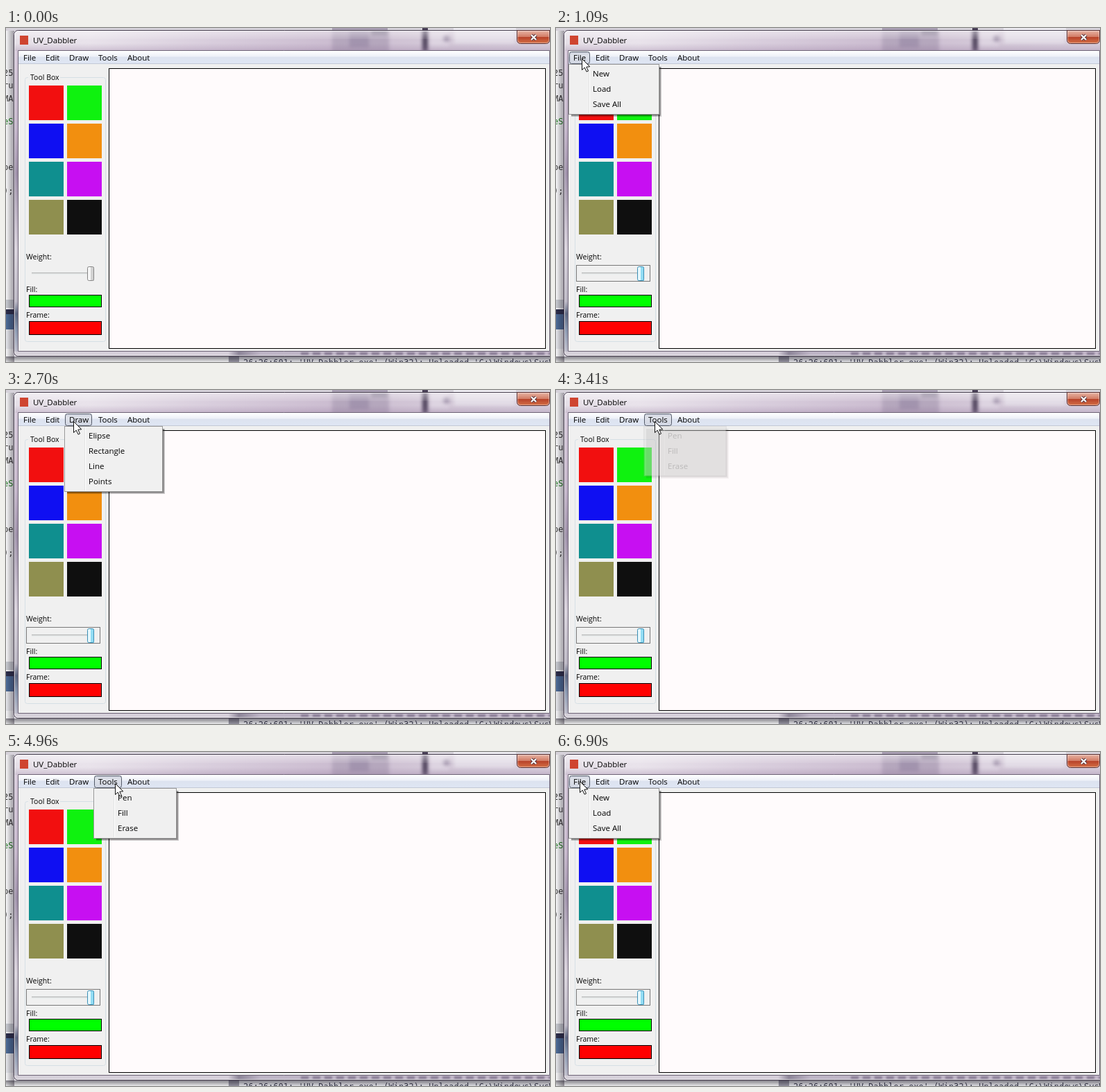
These frames come from a looping animation (784x482 px, 8 s). An HTML page with a canvas:

```html
<!DOCTYPE html>
<html lang="en">
<head>
<meta charset="utf-8">
<title>Paint window</title>
<style>
html, body { margin: 0; width: 100%; height: 100%; overflow: hidden; }
canvas { display: block; width: 784px; height: 482px; }
</style>
</head>
<body>
<canvas id="stage" width="784" height="482"></canvas>
<script>
const W = 784, H = 482, LOOP = 8000;
const UI = '11.5px "Open Sans", sans-serif';
const LABEL = '10.5px "Open Sans", sans-serif';
const CODE = '12px "DejaVu Sans Mono", monospace';

const MENUS = {
  File:  { x: 19,  w: 30, popup: 131, items: ['New', 'Load', 'Save All'] },
  Edit:  { x: 51,  w: 32, popup: 119, items: ['Undo', 'Redo', 'Clear'] },
  Draw:  { x: 85,  w: 39, popup: 142, items: ['Elipse', 'Rectangle', 'Line', 'Points'] },
  Tools: { x: 127, w: 40, popup: 120, items: ['Pen', 'Fill', 'Erase'] },
  About: { x: 169, w: 45, popup: 123, items: ['About'] }
};

// Moment at which each menu title is pressed
const OPENED = [[920, 'File'], [1770, 'Edit'], [2470, 'Draw'], [3320, 'Tools'], [3640, 'About'],
  [4510, 'Tools'], [5520, 'Draw'], [6360, 'Edit'], [6600, 'File']];

// Pointer moves: start time, number of steps, end point
const STEP = 80, SHOWN = 210, START = [562, 419];
const MOVES = [[210, 8, 37, 44], [1700, 2, 53, 43], [2470, 3, 97, 45], [3080, 10, 187, 44],
  [3960, 1, 183, 43], [4120, 2, 172, 43], [4430, 4, 158, 45], [4960, 1, 157, 45],
  [5110, 1, 155, 45], [5360, 5, 104, 44], [6200, 8, 34, 42]];

const stage = document.getElementById('stage').getContext('2d');
const layer = document.createElement('canvas');
layer.width = W;
layer.height = H;
let g = layer.getContext('2d');

function box(x, y, w, h, fill) {
  g.fillStyle = fill;
  g.fillRect(x, y, w, h);
}

function outline(x, y, w, h, color, radius = 0) {
  g.strokeStyle = color;
  g.lineWidth = 1;
  g.beginPath();
  g.roundRect(x + .5, y + .5, w - 1, h - 1, radius);
  g.stroke();
}

function text(s, x, y, font = UI, color = '#000') {
  g.font = font;
  g.fillStyle = color;
  g.fillText(s, x, y);
}

function ramp(x0, y0, x1, y1, ...stops) {
  const r = g.createLinearGradient(x0, y0, x1, y1);
  stops.forEach(([at, color]) => r.addColorStop(at, color));
  return r;
}

function blurred(px, draw) {
  g.save();
  g.filter = `blur(${px}px)`;
  draw();
  g.restore();
}

function backdrop() {
  box(0, 0, W, H, '#f7f7f9');
  box(0, 392, 12, 12, '#c9ccd2');
  box(0, 406, 12, 7, '#2d2f4c');
  box(0, 413, 12, 22, '#4d6c98');
  box(0, 435, 12, 28, '#e6e7ec');
  const lines = [['25', 69], ['ru', 87], ['MA', 106], ['eS', 139, '#1b7a1b'], ['pe', 205], [');', 239]];
  lines.forEach(([s, y, color = '#333']) => text(s, -4, y, CODE, color));

  box(320, 466, 464, 16, '#e9e9ef');
  box(321, 474, 15, 8, '#9a98a6');
  text("26:26:601: 'UV_Dabbler.exe' (Win32): Unloaded 'C:\\Windows\\SysWOW64", 342, 487, CODE, '#3c3c50');

  box(0, 0, 12, H, ramp(0, 0, 12, 0, [0, 'rgba(0,0,0,0)'], [1, 'rgba(30,20,40,.42)']));
  box(0, 474, W, 8, ramp(0, 474, 0, 482, [0, 'rgba(20,15,30,.5)'], [1, 'rgba(0,0,0,.06)']));
  box(0, 0, W, 4, '#d6d2da');
  box(470, 0, 80, 4, '#a89eb2');
  box(600, 0, 8, 4, '#4a4157');
  box(645, 0, 90, 4, '#eceaf0');
}

function glass() {
  g.save();
  g.beginPath();
  g.roundRect(11, 3, W, 471, 6);
  g.clip();
  box(11, 3, W, 471, '#c9bccf');
  box(11, 4, W, 29, ramp(11, 0, W, 0, [0, '#e6e0e8'], [.14, '#e9e3eb'], [.36, '#d9cedd'],
    [.6, '#cbbcd0'], [.82, '#d5cad9'], [1, '#d8cfdd']));
  blurred(2.5, () => {
    box(470, 0, 82, 36, '#b5a7bd');
    box(495, 2, 28, 26, '#a294ae');
    box(526, 0, 24, 10, '#83778f');
    box(600, 0, 8, 34, '#51455e');
    box(612, 4, 26, 24, '#ddd4e1');
    box(646, 2, 88, 20, '#e3dde7');
    g.fillStyle = '#a99cb2';
    g.beginPath();
    g.arc(635, 15, 5, 0, 7);
    g.fill();
  });
  box(11, 4, W, 12, ramp(0, 4, 0, 16, [0, 'rgba(255,255,255,.45)'], [1, 'rgba(255,255,255,.08)']));
  box(11, 22, W, 11, ramp(0, 22, 0, 33, [0, 'rgba(140,110,150,0)'], [1, 'rgba(140,110,150,.28)']));

  // Left and bottom edges
  box(11, 33, 7, 441, ramp(0, 33, 0, 474, [0, '#d7cadb'], [.25, '#c3b4c9'], [.4, '#9d8fa8'],
    [.65, '#d8d2dc'], [.82, '#b9b5c2'], [.86, '#5d6781'], [.91, '#8594ad'], [1, '#c9c4cf']));
  box(11, 467, W, 7, ramp(11, 0, W, 0, [0, '#d5d0d9'], [.4, '#d6cfda'], [.42, '#8d8598'],
    [.46, '#beb5c6'], [1, '#c3b7c9']));
  blurred(1.2, () => {
    for (let x = 425; x < W; x += 17) box(x, 468, 11, 4, '#8a7d95');
  });
  g.restore();
  outline(11, 3, W, 471, '#463d4e', 6);
  outline(12, 4, W, 469, 'rgba(255,255,255,.65)', 5);
}

function closeButton() {
  g.fillStyle = ramp(0, 4, 0, 23, [0, '#e8b4a4'], [.45, '#d27c66'], [.5, '#b8432a'], [1, '#d8754a']);
  g.beginPath();
  g.roundRect(737, 4, 46, 18, [0, 0, 4, 4]);
  g.fill();
  outline(736, 3, 48, 20, '#5a2c2c', [0, 0, 5, 5]);
  outline(737, 4, 46, 18, 'rgba(255,255,255,.4)', [0, 0, 4, 4]);
  for (const [color, width] of [['#57333a', 4.4], ['#fff', 2.3]]) {
    g.strokeStyle = color;
    g.lineWidth = width;
    g.beginPath();
    g.moveTo(757, 10);
    g.lineTo(764, 17);
    g.moveTo(764, 10);
    g.lineTo(757, 17);
    g.stroke();
  }
}

function client() {
  outline(17, 32, 767, 435, '#6d6376');
  box(18, 33, 765, 433, '#f0f0f0');
  box(18, 33, 765, 19, ramp(0, 33, 0, 52, [0, '#ffffff'], [.4, '#eef1f8'], [.5, '#dde3f0'], [1, '#dfe6f4']));
  box(18, 51, 765, 1, '#c3c9d6');
  box(148, 58, 630, 405, '#000');
  box(149, 59, 628, 403, '#fffbfc');

  outline(27, 71, 117, 382, '#d5dfe5', 3);
  box(32, 69, 46, 5, '#f0f0f0');
  text('Tool Box', 35, 75, LABEL);
  const colors = ['#f20f0f', '#0ff20f', '#0f0ff2', '#f28f0f', '#0f8f8f', '#c70ff2', '#8f8f4f', '#0f0f0f'];
  colors.forEach((color, i) => box(33 + i % 2 * 55, 83 + (i >> 1) * 55, 50, 50, color));

  text('Weight:', 29, 334, LABEL);
  text('Fill:', 29, 381, LABEL);
  text('Frame:', 29, 418, LABEL);
  box(33, 385, 105, 18, '#000');
  box(34, 386, 103, 16, '#00ff00');
  box(33, 423, 105, 20, '#000');
  box(34, 424, 103, 18, '#ff0000');
  box(37, 352, 90, 4, '#e7eaea');
  box(37, 353, 90, 1, '#b4b4b4');
}

function slider(focused) {
  const [edge, top, bottom] = focused ? ['#3c8fb5', '#e6f8fd', '#92dcf3'] : ['#858585', '#f6f6f6', '#d2d2d2'];
  g.fillStyle = ramp(117, 0, 127, 0, [0, top], [.5, top], [.55, bottom], [1, bottom]);
  g.fillRect(117, 345, 10, 20);
  outline(117, 344, 10, 21, edge, 2);
  if (focused) {
    g.setLineDash([1, 1]);
    outline(29, 342, 107, 24, '#000');
    g.setLineDash([]);
  }
}

function menuButton({ x, w }, pressed) {
  g.fillStyle = pressed
    ? ramp(0, 34, 0, 52, [0, '#c8ccd8'], [.3, '#dfe2ea'], [1, '#d0d5e2'])
    : ramp(0, 34, 0, 52, [0, '#ffffff'], [.5, '#f0f2f7'], [1, '#e2e6ef']);
  g.beginPath();
  g.roundRect(x, 34, w, 18, 3);
  g.fill();
  outline(x, 34, w, 18, pressed ? '#535a68' : '#a3a9b6', 3);
}

function popup({ x, popup: w, items }, alpha) {
  const left = x - 1, h = items.length * 22 + 7;
  g.save();
  g.globalAlpha = alpha;
  for (let i = 3; i > 0; i--) box(left + 4, 56, w - 4 + i, h - 4 + i, 'rgba(0,0,0,.2)');
  box(left, 52, w, h, '#979797');
  box(left + 1, 53, w - 2, h - 2, '#f5f5f5');
  box(left + 2, 54, w - 4, h - 4, '#f0f0f0');
  box(left + 29, 54, 1, h - 4, '#e2e3e3');
  box(left + 30, 54, 1, h - 4, '#fff');
  items.forEach((s, i) => text(s, left + 35, 70 + i * 22));
  g.restore();
}

function pointer(x, y) {
  const shape = [[0, 0], [0, 16], [3.7, 12.6], [6.6, 18.6], [9, 17.5], [6.3, 11.7], [11.3, 11.3]];
  g.beginPath();
  shape.forEach(([dx, dy]) => g.lineTo(x + dx + .5, y + dy + .5));
  g.closePath();
  g.fillStyle = '#fff';
  g.fill();
  g.strokeStyle = '#111';
  g.lineWidth = 1;
  g.stroke();
}

function pointerAt(t) {
  let [x, y] = START;
  for (const [from, steps, toX, toY] of MOVES) {
    if (t < from) break;
    const p = Math.min(1, (Math.floor((t - from) / STEP) + 1) / steps);
    const e = p * p * (3 - 2 * p);
    x += (toX - x) * e;
    y += (toY - y) * e;
  }
  return [Math.round(x), Math.round(y)];
}

function render(t) {
  const [px, py] = pointerAt(t);
  const open = OPENED.filter(([at]) => t >= at).pop();
  stage.drawImage(layer, 0, 0);
  slider(Boolean(open));
  for (const [name, menu] of Object.entries(MENUS)) {
    const hover = !open && py < 52 && px >= menu.x && px < menu.x + menu.w;
    const pressed = Boolean(open) && open[1] === name;
    if (hover || pressed) menuButton(menu, pressed);
    text(name, menu.x + 6, 47);
  }
  if (open) {
    const alpha = Math.min(1, Math.max(0, (t - open[0] - 75) / 90));
    if (alpha) popup(MENUS[open[1]], alpha);
  }
  if (t >= SHOWN) pointer(px, py);
}

backdrop();
glass();
closeButton();
client();
box(20, 11, 12, 13, '#cf4430');
text('UV_Dabbler', 39, 22);
g = stage;

const began = performance.now();
function tick() {
  render((performance.now() - began) % LOOP);
  requestAnimationFrame(tick);
}
render(0);
requestAnimationFrame(tick);
</script>
</body>
</html>
```
